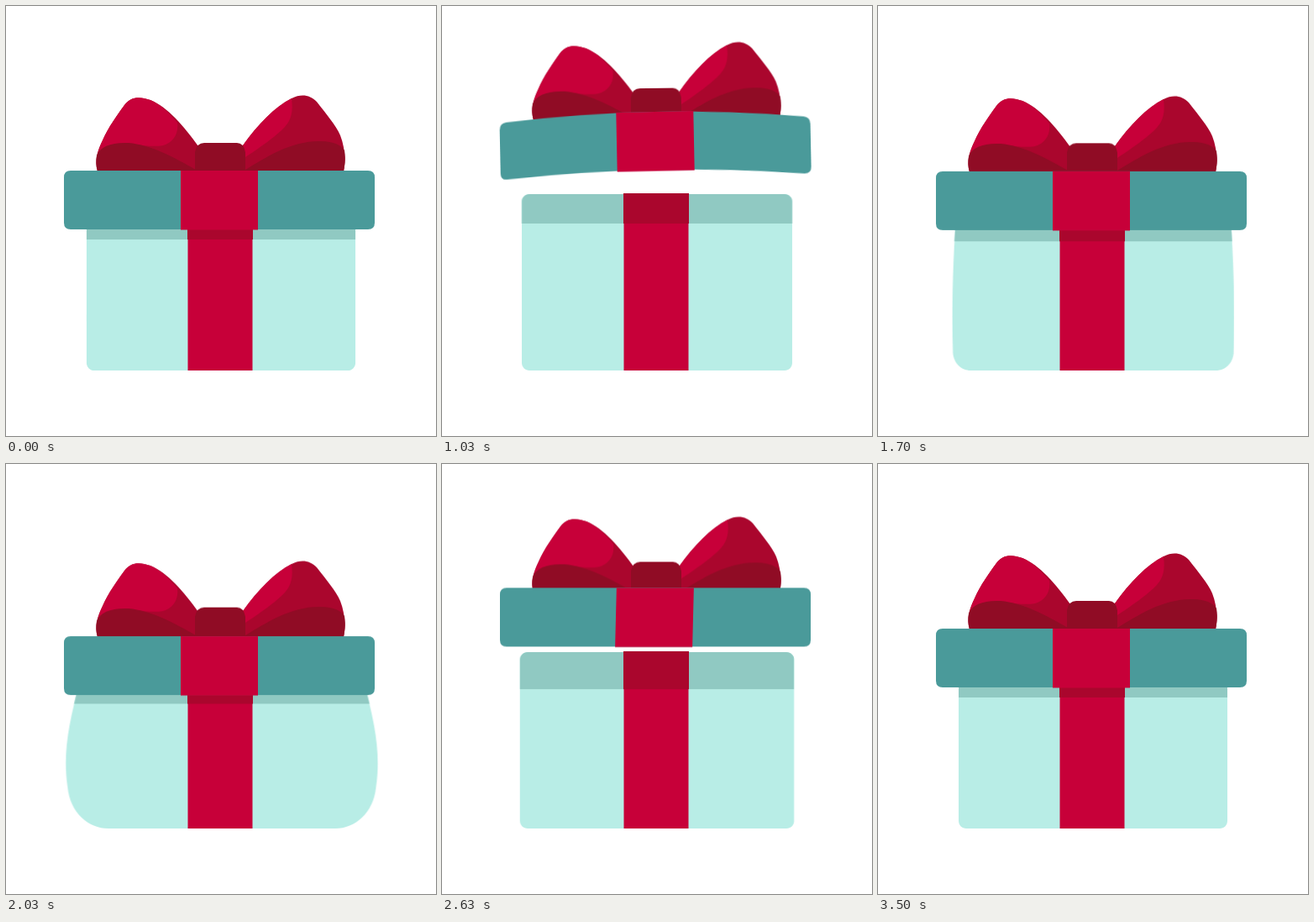
Recreate the animation shown at these times as an HTML page without scripts. Size 512 px wide and 512 px high, loop 3.56 s.

```html
<!DOCTYPE html>
<html lang="en">
<head>
<meta charset="utf-8">
<title>Gift box</title>
<style>
html, body { margin: 0; width: 100%; height: 100%; overflow: hidden; background: #fff; }
svg { display: block; width: 100%; height: 100%; }

.box, .wide, .shade, .lid, .top, .band, .bow, .left, .right, .knot {
  animation: 3.56s linear infinite;
}
.box { animation-name: box; }
.wide { animation-name: wide; transform-origin: 256px 434px; }
.shade { animation-name: shade; }
.lid { animation-name: lid; transform-origin: 254px 231px; }
.top { animation-name: top; }
.band { animation-name: band; transform-origin: 254px 231px; }
.bow { animation-name: bow; transform-origin: 255px 196px; }
.left { animation-name: left; transform-origin: 225px 196px; }
.right { animation-name: right; transform-origin: 285px 196px; }
.knot { animation-name: knot; }

.bright { fill: #c70039; }
.mid { fill: #aa062d; }
.dark { fill: #900c25; }
.mint { fill: #b8ede6; }
.teal { fill: #4a9a9a; }

/* straight crate <-> bulging crate */
@keyframes box {
  0%, 28.93%, 43.82%, 70.22%, 100% {
    d: path("M105 224 L407 224 C412 224 416 228 416 233 C416 290 416 360 416 425 C416 430 412 434 407 434 L105 434 C100 434 96 430 96 425 C96 360 96 290 96 233 C96 228 100 224 105 224Z");
  }
  9.27%, 25%, 57.02%, 66.29% {
    d: path("M94 240 L420 240 C423 240 426 248 428 258 C442 310 449 345 443 385 C440 415 418 434 394 434 L120 434 C96 434 74 415 71 385 C65 345 72 310 86 258 C88 248 91 240 94 240Z");
  }
}
@keyframes wide {
  0%, 9.27%, 26.97%, 42.13%, 43.82%, 68.26%, 85.11%, 100% { transform: none; }
  11.24%, 25%, 66.29% { transform: scaleX(1.008); }
  57.02% { transform: scaleX(.987); }
  28.93%, 70.22% { transform: scaleX(1.006); }
  32.58%, 73.88% { transform: scaleX(1.02); }
  36.52%, 77.81% { transform: scaleX(1.031); }
}
@keyframes shade {
  0%, 42.13%, 43.82%, 85.11%, 100% { transform: none; }
  9.27%, 25%, 57.02%, 66.29% { transform: translateY(7.5px); }
  26.97%, 68.26% { transform: translateY(-6px); }
  28.93%, 70.22% { transform: translateY(-19px); }
  30.9%, 71.91% { transform: translateY(-17px); }
  32.58%, 73.88% { transform: translateY(-10px); }
  36.52%, 77.81% { transform: translateY(8px); }
}
@keyframes lid {
  0%, 43.82% { transform: none; animation-timing-function: ease-in-out; }
  11.24%, 25%, 66.29% { transform: translateY(14px); }
  26.97%, 68.26% { transform: translateY(-26px) rotate(-1deg); }
  28.93%, 70.22% { transform: translateY(-70px) rotate(-1.2deg); }
  30.9%, 71.91% { transform: translateY(-68px) rotate(1.5deg); }
  32.58%, 73.88% { transform: translateY(-49px); }
  34.55%, 75.84% { transform: translateY(-12px); }
  36.52%, 77.81% { transform: translateY(8px); }
  42.13%, 85.11%, 100% { transform: none; }
}
@keyframes top {
  0%, 25%, 32.58%, 66.29%, 73.88%, 100% {
    d: path("M77 196 Q254 196 431 196 Q439 196 439 204 L439 258 Q439 266 431 266 Q254 266 77 266 Q69 266 69 258 L69 204 Q69 196 77 196Z");
  }
  28.93%, 70.22% {
    d: path("M77 205 Q254 187 431 205 Q439 206 439 214 L439 265 Q439 273 431 273 Q254 257 77 273 Q69 274 69 266 L69 214 Q69 206 77 205Z");
  }
}
@keyframes band {
  0%, 30.9%, 42.13%, 71.91%, 85.11%, 100% { transform: none; }
  32.58%, 36.52%, 73.88%, 77.81% { transform: translateX(-1px) skewX(-1.4deg); }
}
@keyframes bow {
  0%, 43.82% { transform: none; animation-timing-function: ease-in-out; }
  11.24%, 25%, 66.29% { transform: translateY(14px); }
  26.97%, 68.26% { transform: translateY(-18px); }
  28.93%, 70.22% { transform: translateY(-62.5px) rotate(-.6deg); }
  30.9%, 71.91% { transform: translateY(-62px) rotate(.6deg); }
  32.58%, 73.88% { transform: translateY(-44px); }
  34.55%, 75.84% { transform: translateY(-10px); }
  36.52%, 77.81% { transform: translateY(9px); }
  42.13%, 85.11%, 100% { transform: none; }
}
@keyframes left {
  0%, 32.58%, 42.13%, 73.88%, 85.11%, 100% { transform: none; }
  36.52%, 77.81% { transform: skewX(-7.3deg); }
}
@keyframes right {
  0%, 32.58%, 42.13%, 73.88%, 85.11%, 100% { transform: none; }
  36.52%, 77.81% { transform: skewX(6deg); }
}
@keyframes knot {
  0%, 42.13%, 85.11%, 100% { transform: none; }
  32.58%, 73.88% { transform: translateY(-3px); }
  36.52%, 77.81% { transform: translateY(11px); }
}
</style>
</head>
<body>
<svg viewBox="0 0 512 512">
  <defs>
    <clipPath id="inBox"><path class="box" d="M96 224H416V434H96Z"/></clipPath>
    <clipPath id="inStrip"><rect x="216.5" y="223" width="77" height="211"/></clipPath>
  </defs>

  <g class="wide">
    <path class="box mint" d="M96 224H416V434H96Z"/>
    <g clip-path="url(#inBox)">
      <rect class="shade" x="40" y="178" width="440" height="100" fill="#90c9c2"/>
    </g>
  </g>
  <g clip-path="url(#inStrip)">
    <rect class="bright" x="216" y="200" width="78" height="240"/>
    <rect class="shade mid" x="216" y="178" width="78" height="100"/>
  </g>

  <g class="bow">
    <g class="left">
      <path class="mid" d="M110 203 L109 197 C105 184 109 172 115 160 C122 144 133 129 141 118 C149 107 160 108 172 112 C192 120 212 143 229 167 L228 203Z"/>
      <path class="bright" d="M108 180 C110 172 112 166 115 160 C122 144 133 129 141 118 C149 107 160 108 172 112 C184 117 194 127 204 139 C206 153 198 163 187 166 C172 169 155 163 140 166 L108 180Z"/>
      <path class="dark" d="M110 203 L109 197 C107 190 107 184 108 178 C112 167 126 162 146 163 C172 165 202 181 226 195 V203Z"/>
    </g>
    <g class="right">
      <path class="mid" d="M282 166 C300 141 320 120 340 110 C352 104 362 106 370 114 C380 127 393 142 398 154 C403 167 405 183 402 197 L401 203 H284Z"/>
      <path class="bright" d="M282 166 C300 141 320 120 340 110 C342 125 340 135 332 144 C322 155 300 170 285 180Z"/>
      <path class="dark" d="M285 203 V195 C310 180 340 160 375 161 C390 161 400 166 403 172 C405 184 403 190 402 197 L401 203Z"/>
    </g>
    <path class="knot dark" d="M225 205 V174 Q227 163 236 163 H275 Q283 163 285 174 V205Z"/>
  </g>

  <g class="lid">
    <path class="top teal" d="M69 196H439V266H69Z"/>
    <rect class="band bright" x="208" y="196" width="92" height="70.5"/>
  </g>
</svg>
</body>
</html>
```
